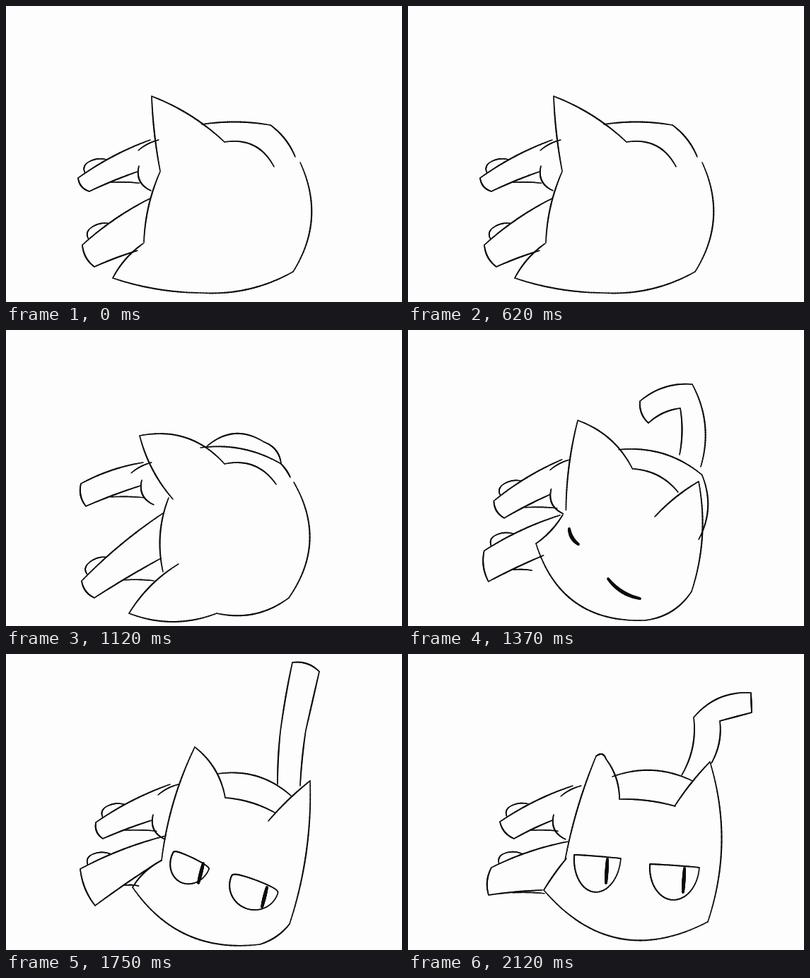
Animation, 560 px wide and 420 px high, one loop 2.5 s. Source, as an HTML page with a canvas:

```html
<!DOCTYPE html>
<html lang="en">
<head>
<meta charset="utf-8">
<title>Waking cat</title>
<style>
  html, body { margin: 0; width: 100%; height: 100%; overflow: hidden; background: #fdfdfd; }
  canvas { display: block; }
</style>
</head>
<body>
<canvas id="stage" width="560" height="420"></canvas>
<script>
const LOOP = 2500;
const PEN = 2.1, THIN = 1.7, BRUSH = 5;
const ctx = document.getElementById('stage').getContext('2d');

// Outlines are corner points joined by bowed arcs: x, y, bow, x, y, bow, x, y ...
// A positive bow bulges to the left of the direction of travel.
// leg, arm: shoulder, paw top, paw bottom, elbow, underside length, far paw shown.
// eyes: centre, radii, lid height, tilt. gaze: pupil offset, slant, length.
const curl = {
  crown: [218,234, 2, 206,128, 6, 309,193, 14, 379,228],
  skull: [416,222, 21, 406,377, 10, 275,407, 5, 151,386, 4, 194,337],
  neck: [195,336, 5, 218,235],
  back: [277,168, 4, 374,169, 4, 409,214],
  leg: [204,190, 102,244, 118,263, 186,235, 40, 1],
  arm: [204,273, 108,339, 125,370, 186,347, 0, 1]
};

const roll = {
  crown: [236,240, 6, 189,150, 18, 309,190, 13, 382,219],
  skull: [407,216, 26, 400,380, 12, 298,402, 12, 174,402, 6, 244,332],
  neck: [222,343, 8, 230,238],
  back: [275,167, 10, 389,190, 1, 402,209],
  lump: [284,165, 15, 365,159, 6, 389,190],
  leg: [194,188, 106,218, 113,250, 190,221, 48, 0],
  arm: [222,260, 107,356, 125,380, 219,324, 42, 1]
};

const lift = {
  crown: [218,262, 3, 262,119, 7, 321,200, 6, 382,235],
  face: [349,265, 3, 411,215, 10, 401,371, 9, 335,412, 36, 181,303, -3, 219,262],
  back: [308,171, 14, 427,212, 15, 415,335],
  tail: [384,177, -3, 385,111, -4, 340,132, 4, 328,101, 8, 402,77, 12, 414,194],
  lidL: [228,282, -3, 241,304],
  lidR: [283,353, -5, 328,381],
  leg: [228,182, 128,253, 146,274, 205,239, 45, 1],
  arm: [212,264, 108,295, 109,347, 180,318, 20, 1]
};

const stare = {
  crown: [220,293, 7, 267,132, 8, 310,204, 4, 380,225],
  face: [371,237, 2, 430,180, 9, 401,383, 4, 359,412, 30, 179,331, 4, 220,293],
  back: [299,170, 13, 404,202],
  tail: [384,185, 1, 388,110, 1, 405,12, 5, 443,25, 0, 424,108, -1, 416,187],
  eyeL: [261,295, 28, 32, 0.2, 0.45],
  eyeR: [351,329, 35, 34, 0.25, 0.36],
  gaze: [18, 2, -7, 28],
  leg: [232,185, 127,239, 137,262, 206,236, 45, 1],
  arm: [226,258, 105,305, 126,357, 219,293, 20, 1]
};

const watch = {
  crown: [225,293, 2, 259,140, 5, 275,141, 2, 306,205, 4, 375,210],
  face: [375,210, 0, 429,151, 10, 421,373, 52, 188,338, 2, 224,290],
  back: [293,174, 10, 395,190],
  tail: [388,176, -3, 388,140, 14, 404,38, 6, 446,54, -6, 419,115, -1, 427,150],
  eyeL: [268,298, 34, 37, 0.45, 0.03],
  eyeR: [377,314, 37, 39, 0.47, 0.03],
  gaze: [13, -17, -2, 32],
  leg: [238,185, 133,229, 138,257, 204,236, 42, 1],
  arm: [228,262, 107,309, 132,361, 224,293, 22, 1]
};

const settle = {
  crown: [222,293, 4, 266,145, 5, 280,149, 5, 299,206, 3, 378,216],
  face: [377,216, 2, 427,153, 18, 424,380, 47, 192,335, 1, 224,290],
  back: [289,174, 12, 402,180],
  tail: [387,172, -7, 404,90, 11, 485,55, 0, 486,83, 0, 441,95, 5, 429,155],
  eyeL: [268,288, 33, 50, 0.02, 0.08],
  eyeR: [377,301, 35, 48, 0.02, 0.07],
  gaze: [14, 3, -2, 34],
  leg: [233,187, 130,238, 150,262, 204,236, 38, 1],
  arm: [227,266, 118,303, 114,342, 190,335, 45, 1]
};

const timeline = [
  [0, curl],
  [250, twitch(-0.3)],
  [370, twitch(0.25)],
  [500, twitch(-0.12)],
  [620, curl],
  [870, mix(curl, roll, 0.5)],
  [1120, roll],
  [1250, mix(roll, lift, 0.35)],
  [1370, mix(roll, lift, 0.7)],
  [1500, lift],
  [1620, mix(lift, stare, 0.8)],
  [1750, stare],
  [1870, watch],
  [2000, mix(watch, settle, 0.5)],
  [2120, settle]
];

// Swings the ear tip of the curled cat around the root of the ear.
function twitch(angle) {
  const [rootX, rootY] = [262, 215];
  const crown = [...curl.crown];
  const dx = crown[3] - rootX, dy = crown[4] - rootY;
  crown[3] = rootX + dx * Math.cos(angle) - dy * Math.sin(angle);
  crown[4] = rootY + dx * Math.sin(angle) + dy * Math.cos(angle);
  return { ...curl, crown };
}

// Blends parts of equal structure; the rest come from the nearer pose.
function mix(from, to, k) {
  const pose = { ...(k < 0.5 ? from : to) };
  for (const part in pose) {
    const a = from[part], b = to[part];
    if (a && b && a.length === b.length) pose[part] = a.map((v, i) => v + (b[i] - v) * k);
  }
  return pose;
}

// Draws point(t) for t from 0 to 1 with a pen that lightens at both ends.
function stroke(point, weight = PEN, steps = 32) {
  for (let i = 0; i < steps; i++) {
    ctx.lineWidth = weight * (0.75 + 0.25 * Math.sin(Math.PI * (i + 0.5) / steps));
    ctx.beginPath();
    ctx.moveTo(...point(i / steps));
    ctx.lineTo(...point((i + 1) / steps));
    ctx.stroke();
  }
}

function outline(chain, weight) {
  for (let i = 0; i + 4 < chain.length; i += 3) {
    const [x, y, bow, endX, endY] = chain.slice(i, i + 5);
    const dx = endX - x, dy = endY - y;
    const lift = 4 * bow / (Math.hypot(dx, dy) || 1);
    stroke(t => {
      const bulge = lift * t * (1 - t);
      return [x + dx * t + dy * bulge, y + dy * t - dx * bulge];
    }, weight);
  }
}

function limb([sx, sy, px, py, qx, qy, ex, ey, under, far]) {
  outline([sx, sy, -4, px, py, -4, qx, qy, 1, ex, ey]);
  if (under) {
    const x = qx + (ex - qx) * 0.45, y = qy + (ey - qy) * 0.45;
    outline([x, y, 1, x + under, y + 1], THIN);
  }
  if (far > 0.5) {
    const length = Math.hypot(sx - px, sy - py);
    const ux = (sx - px) / length, uy = (sy - py) / length;
    const beside = (along, out) => [px + ux * along + uy * out, py + uy * along - ux * out];
    outline([...beside(12, 2), 3, ...beside(22, 13), 3, ...beside(48, 4)], THIN);
  }
}

function hip([sx, sy, , , , , ex, ey]) {
  outline([sx - 17, sy + 15, 2, sx + 12, sy], THIN);
  outline([ex + 2, ey - 8, -8, ex + 19, ey + 27]);
}

function eye([cx, cy, rx, ry, lid, tilt], [dx, dy, slant, length]) {
  const cos = Math.cos(tilt), sin = Math.sin(tilt);
  stroke(t => {
    const angle = 2 * Math.PI * t;
    const height = Math.sin(angle);
    const x = rx * Math.cos(angle);
    const y = ry * (height > 0 ? height : -lid * Math.sqrt(-height));
    return [cx + x * cos - y * sin, cy + x * sin + y * cos];
  }, PEN, 64);
  outline([cx + dx, cy + dy, 0, cx + dx + slant, cy + dy + length], BRUSH);
}

function drawCat(pose) {
  for (const part of ['crown', 'skull', 'neck', 'face', 'back', 'lump', 'tail']) {
    if (pose[part]) outline(pose[part]);
  }
  limb(pose.leg);
  limb(pose.arm);
  hip(pose.leg);
  if (pose.gaze) {
    eye(pose.eyeL, pose.gaze);
    eye(pose.eyeR, pose.gaze);
  }
  if (pose.lidL) {
    outline(pose.lidL, BRUSH);
    outline(pose.lidR, BRUSH);
  }
}

function draw() {
  const time = performance.now() % LOOP;
  ctx.fillStyle = '#fdfdfd';
  ctx.fillRect(0, 0, 560, 420);
  ctx.strokeStyle = '#0c0c0c';
  ctx.lineCap = 'round';
  drawCat(timeline.findLast(([start]) => start <= time)[1]);
  requestAnimationFrame(draw);
}

draw();
</script>
</body>
</html>
```
